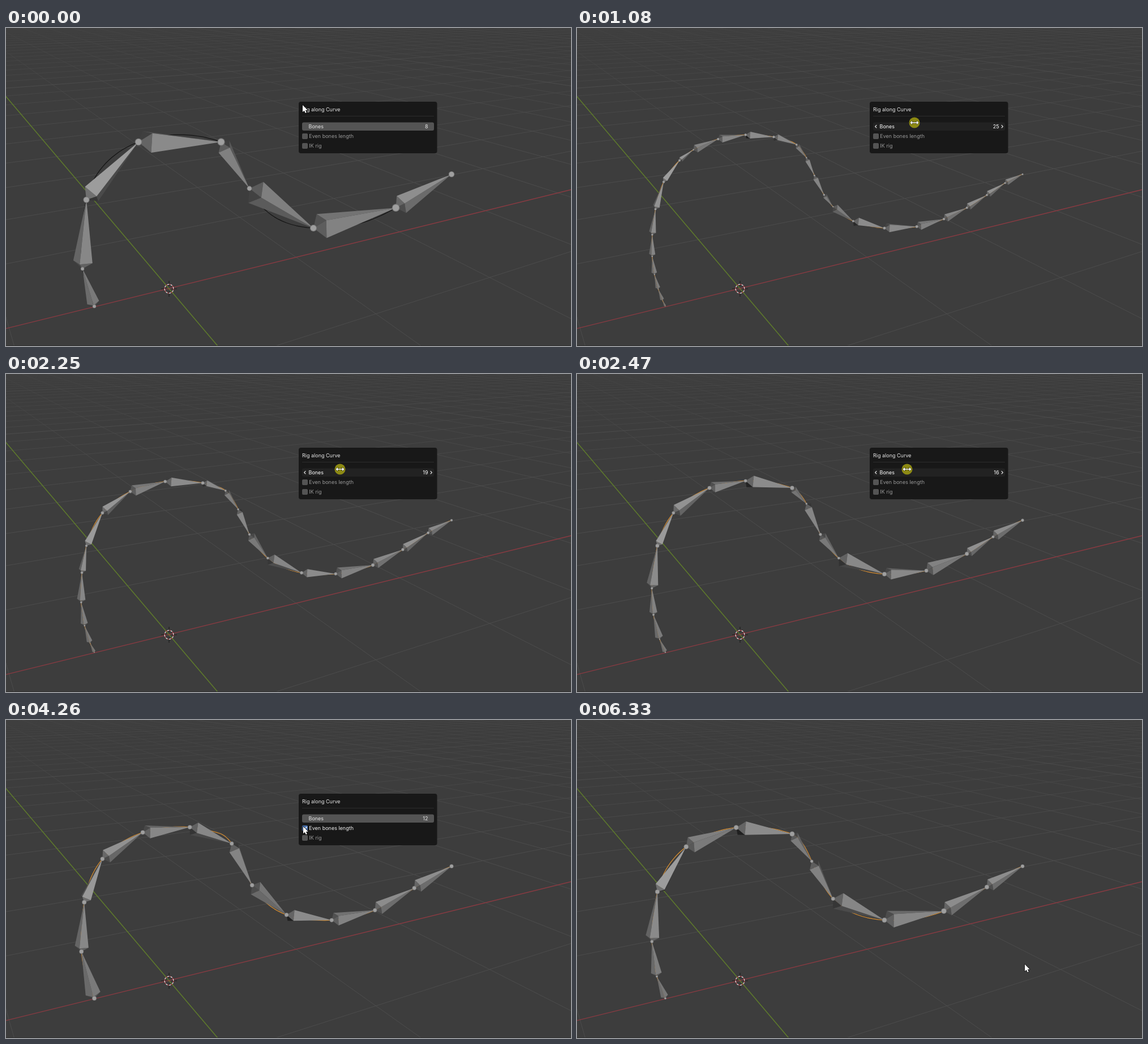
Animation of 998x561 px, one loop 6410 ms. Source, as an HTML page with a canvas:

```html
<!DOCTYPE html>
<html lang="en">
<head>
<meta charset="utf-8">
<title>Rig along Curve</title>
<style>
html, body { margin: 0; width: 100%; height: 100%; overflow: hidden; background: #3d3d3d; }
canvas { display: block; width: 998px; height: 561px; }
</style>
</head>
<body>
<canvas id="stage" width="998" height="561"></canvas>
<script>
const W = 998, H = 561, LOOP = 6410, STEP = 72, SAMPLES = 72;
const ctx = document.getElementById('stage').getContext('2d');

// World axes as seen by the camera: right, down, away
const AX = [0.86, -0.16, 0.48], AY = [-0.5, -0.27, 0.82], AZ = [0, -0.95, -0.31];

// Cubic spline: knot, handle, handle, knot, ...
const spline = [
  [156, 491], [142, 463], [119, 405], [142, 303], [165, 201], [285, 167], [380, 201],
  [430, 225], [409, 345], [543, 353], [668, 361], [725, 281], [787, 258]
];
// Time, pointer x, pointer y, bone count
const moves = [
  [144, 524, 136, 8], [576, 580, 166, 8], [864, 580, 166, 8], [1080, 596, 167, 25],
  [1368, 603, 168, 30], [1944, 596, 168, 26], [2232, 590, 168, 19], [2664, 576, 168, 12],
  [3096, 576, 168, 12], [3744, 525, 188, 12], [5976, 525, 188, 12], [6336, 791, 431, 12]
];

const gray = v => `rgb(${v},${v},${v})`;
const mix = (a, b, f) => a.map((v, i) => v + (b[i] - v) * f);
const dist = (a, b) => Math.hypot(b[0] - a[0], b[1] - a[1]);

function pose(t) {
  const i = moves.findIndex(m => m[0] > t);
  if (i < 1) return i ? moves[moves.length - 1] : moves[0];
  const a = moves[i - 1], b = moves[i];
  return mix(a, b, (t - a[0]) / (b[0] - a[0]));
}

function pointAt(u) {
  const s = u * 4 / SAMPLES, i = Math.min(3, Math.floor(s)), f = s - i;
  let p = spline.slice(i * 3, i * 3 + 4);
  while (p.length > 1) p = p.slice(1).map((q, k) => mix(p[k], q, f));
  return p[0];
}

// Joints of equal length; the right side lies a little farther away
function evenJoints(count) {
  const joints = [], ends = [0];
  for (let u = 0; u < SAMPLES; u += 0.125) {
    const a = pointAt(u), b = pointAt(u + 0.125);
    ends.push(ends[ends.length - 1] + dist(a, b) * (1 + a[0] / 6000));
  }
  const total = ends[ends.length - 1];
  for (let k = 0; k < count; k++)
    joints.push(pointAt(ends.findIndex(e => e >= total * k / count) * 0.125));
  return [...joints, pointAt(SAMPLES)];
}

const sampledJoints = count => Array.from({ length: count + 1 },
  (_, k) => pointAt(Math.floor(SAMPLES * k / count + 1e-9)));

function line(x1, y1, x2, y2, color, width = 1) {
  ctx.strokeStyle = color;
  ctx.lineWidth = width;
  ctx.beginPath();
  ctx.moveTo(x1, y1);
  ctx.lineTo(x2, y2);
  ctx.stroke();
}

function poly(points, fill) {
  ctx.beginPath();
  points.forEach(p => ctx.lineTo(p[0], p[1]));
  ctx.closePath();
  ctx.fillStyle = fill;
  ctx.fill();
}

function disc(x, y, r, fill) {
  ctx.beginPath();
  ctx.arc(x, y, r, 0, 7);
  ctx.fillStyle = fill;
  ctx.fill();
}

function box(x, y, w, h, r, fill) {
  ctx.beginPath();
  ctx.roundRect(x, y, w, h, r);
  ctx.fillStyle = fill;
  ctx.fill();
}

function text(s, x, y, color, align = 'left') {
  ctx.font = '9px Inter, sans-serif';
  ctx.textAlign = align;
  ctx.fillStyle = color;
  ctx.fillText(s, x, y);
}

function fade(v) {
  const g = ctx.createLinearGradient(0, 0, 0, 240);
  g.addColorStop(0, `rgba(${v},${v},${v},.35)`);
  g.addColorStop(1, gray(v));
  return g;
}

// Floor lines run from the two vanishing points to even steps on the bottom edge
function drawFloor() {
  ctx.fillStyle = '#3d3d3d';
  ctx.fillRect(0, 0, W, H);
  const minor = fade(75), major = fade(84);
  const alongX = (n, c, w) => line(2476, -77.5, -125.5 - 601 * n, H, c, w);
  const alongY = (n, c, w) => line(-169, -78, 374 + 359.5 * n, H, c, w);
  for (let n = -2; n <= 30; n++) {
    if (!n) continue;
    const c = n % 10 ? minor : major;
    alongX(n, c);
    alongY(n, c);
  }
  alongX(0, '#8c3a42', 1.3);
  alongY(0, '#5f7c2b', 1.5);
  ctx.fillStyle = '#303030';
  ctx.fillRect(0, H - 1, W, 1);
}

function drawOriginMark() {
  const x = 288, y = 460;
  for (const s of [-1, 1]) {
    line(x, y + s * 5, x, y + s * 14, '#161616');
    line(x + s * 5, y, x + s * 14, y, '#2a1a1b');
  }
  ctx.lineWidth = 1.3;
  for (let i = 0; i < 16; i++) {
    ctx.strokeStyle = i % 2 ? '#e8e8e8' : '#b8474f';
    ctx.beginPath();
    ctx.arc(x, y, 7.8, i * Math.PI / 8, (i + 1) * Math.PI / 8);
    ctx.stroke();
  }
  disc(x, y, 1.4, '#7d5a34');
}

function drawCurve(color) {
  ctx.beginPath();
  for (let u = 0; u <= SAMPLES; u += 0.5) ctx.lineTo(...pointAt(u));
  ctx.strokeStyle = color;
  ctx.lineWidth = 1.2;
  ctx.stroke();
}

// Octahedral bone in the XZ plane, with its waist at a tenth of the length
function drawBone(head, tail) {
  const dx = tail[0] - head[0], dy = tail[1] - head[1];
  const a = dx / AX[0], b = (dy - a * AX[1]) / AZ[1], size = Math.hypot(a, b);
  const nx = a / size, nz = b / size;
  const dir = AX.map((v, i) => v * nx + AZ[i] * nz);
  // Shortest turn from the Y axis to the bone, applied to the other two axes
  const turn = (axis, n) => axis.map((v, i) => v - n * (AY[i] + dir[i]));
  const facing = v => v[2] > 0 ? v.map(c => -c) : v;
  const sides = [facing(turn(AX, nx)), facing(turn(AZ, nz))];
  const corner = (n, m, s) =>
    [0, 1].map(i => head[i] + 0.1 * (tail[i] - head[i]) + 0.1 * size * (n[i] + s * m[i]));
  const faces = sides.map((n, i) => ({
    front: -n[2],
    shade: 60 - 95 * n[2] - 20 * n[1],
    edge: [corner(n, sides[1 - i], -1), corner(n, sides[1 - i], 1)]
  })).sort((p, q) => p.front - q.front);
  for (const f of faces) poly([head, ...f.edge], gray(f.shade * 0.72));
  for (const f of faces) poly([tail, ...f.edge], gray(f.shade));
}

function drawRig(joints) {
  for (let i = 1; i < joints.length; i++) drawBone(joints[i - 1], joints[i]);
  joints.forEach(([x, y], i) => {
    const k = Math.max(1, i), r = 0.046 * dist(joints[k - 1], joints[k]);
    disc(x, y, r, '#757575');
    disc(x, y, r * 0.82, '#9f9f9f');
  });
}

function chevron(x, dir) {
  ctx.beginPath();
  ctx.moveTo(x - dir * 1.3, 171.2);
  ctx.lineTo(x + dir * 1.3, 173.8);
  ctx.lineTo(x - dir * 1.3, 176.4);
  ctx.strokeStyle = '#f0f0f0';
  ctx.lineWidth = 1.2;
  ctx.stroke();
}

function checkbox(y, label, on, hover) {
  box(523, y, 10, 10, 2, on ? '#4772b3' : hover ? '#656565' : '#545454');
  if (on) {
    line(525, y + 5.2, 527.3, y + 7.5, '#fff', 1.4);
    line(527.3, y + 7.5, 531.3, y + 2.5, '#fff', 1.4);
  }
  text(label, 535.3, y + 8.2, on ? '#f0f0f0' : '#989898');
}

function drawPanel(count, even, hover, drag, overBox) {
  box(517, 130, 244.5, 91, 4, '#181818');
  text('Rig along Curve', 523, 146.5, '#e6e6e6');
  line(523, 155.5, 756, 155.5, '#2c2c2c');
  box(523, 166.5, 233, 14.5, 3, drag ? '#222' : hover ? '#797979' : '#545454');
  const ink = hover || drag ? '#fff' : '#e6e6e6';
  text('Bones', 534.5, 177, ink);
  text(count, 745.5, 177, ink, 'right');
  if (hover || drag) {
    chevron(528, -1);
    chevron(751, 1);
  }
  checkbox(186, 'Even bones length', even, overBox);
  checkbox(203, 'IK rig', false, false);
}

function pointerPath(x, y, points, outline) {
  ctx.beginPath();
  points.forEach(p => ctx.lineTo(x + p[0], y + p[1]));
  ctx.closePath();
  ctx.lineJoin = 'round';
  ctx.lineWidth = outline;
  ctx.strokeStyle = '#111';
  ctx.stroke();
  ctx.fillStyle = '#fff';
  ctx.fill();
}

function drawPointer(x, y, sideways) {
  if (sideways) {
    const half = [[-7.5, 0], [-4, -3.2], [-4, -0.8], [4, -0.8], [4, -3.2]];
    pointerPath(x, y, [...half, ...half.map(p => [-p[0], -p[1]])], 1);
  } else {
    pointerPath(x, y, [[0, 0], [0, 12.3], [2.8, 9.8], [4.8, 14], [6.8, 13.1], [4.9, 9], [8.6, 8.8]], 1.6);
  }
}

function draw(t) {
  const [, x, y, n] = pose(Math.floor(t / STEP + 0.25) * STEP);
  const count = Math.round(n);
  const drag = t >= 920 && t < 3040;
  const even = t >= 4180 && t < 5250;
  const click = drag || t >= 4110 && t < 4260 || t >= 5250 && t < 5400;
  const hover = t < 3800 && y >= 164 && y < 183;
  const overBox = t >= 3700 && y < 198;

  drawFloor();
  drawOriginMark();
  drawCurve(t < 920 ? '#141414' : '#d98e2f');
  drawRig(even ? evenJoints(count) : sampledJoints(count));
  if (t < 6190) drawPanel(count, even, hover, drag, overBox);
  if (click) disc(x, y, 9.5, 'rgba(160,156,18,.85)');
  drawPointer(x, y, hover);
}

function tick() {
  draw(performance.now() % LOOP);
  requestAnimationFrame(tick);
}
tick();
</script>
</body>
</html>
```
